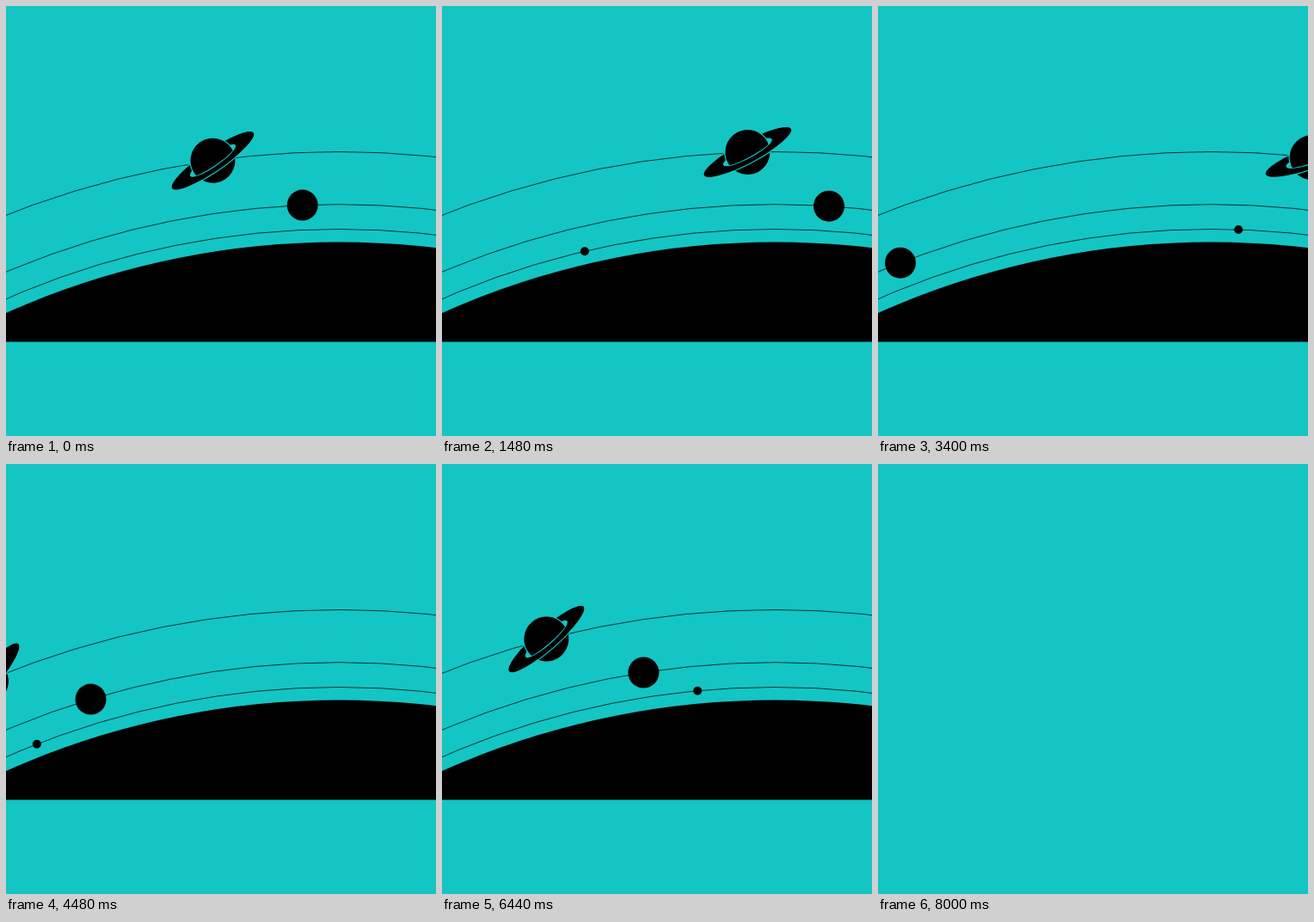
An HTML page with a canvas for the animation above (8040 ms loop, 500 by 500 pixels).

```html
<!DOCTYPE html>
<html>
<head>
<meta charset="utf-8">
<title>Orbits</title>
<style>
html, body { margin: 0; height: 100%; overflow: hidden; background: #13c5c3; }
canvas { display: block; }
</style>
</head>
<body>
<canvas id="stage" width="500" height="500"></canvas>
<script>
const ctx = document.getElementById('stage').getContext('2d');
const TEAL = '#13c5c3', INK = '#000';
const LOOP = 8040, STEP = 40, BLANK = 8000;
const CX = 387, CY = 1223.5, HORIZON = 949;
const DOT = 964, MOON = 992.8, RINGED = 1054;
const TAU = Math.PI * 2, RAD = Math.PI / 180;

function ellipse(x, y, a, b, fill) {
  ctx.beginPath();
  ctx.ellipse(x, y, a, b, 0, 0, TAU);
  if (fill) {
    ctx.fillStyle = fill;
    ctx.fill();
  }
}

const disc = (x, y, r, fill) => ellipse(x, y, r, r, fill);

// Angles are in degrees, clockwise from the top of the orbit.
function place(radius, angle) {
  return [CX + radius * Math.sin(angle * RAD), CY - radius * Math.cos(angle * RAD)];
}

function drawRinged(angle) {
  ctx.save();
  ctx.translate(...place(RINGED, angle));
  ctx.rotate((angle - 26.4) * RAD);
  disc(0, 0, 26, INK);
  ellipse(0, 0, 57.5, 12.4, INK);
  ctx.strokeStyle = TEAL;
  ctx.lineWidth = 1.2;
  ellipse(0, 0, 58.1, 13);
  ctx.stroke();
  ellipse(0, 0, 32, 7.2, TEAL);

  // The upper body passes in front of the far side of the ring.
  ctx.beginPath();
  ctx.moveTo(-32, -40);
  ctx.lineTo(32, -40);
  ctx.ellipse(0, 0, 32, 6, 0, 0, Math.PI);
  ctx.closePath();
  ctx.clip();
  disc(0, 0, 27.2, TEAL);
  disc(0, 0, 26, INK);
  ctx.restore();
}

function draw(ms) {
  ctx.fillStyle = TEAL;
  ctx.fillRect(0, 0, 500, 500);
  if (ms >= BLANK) return;

  const t = ms / 1000;
  ctx.save();
  ctx.beginPath();
  ctx.rect(0, 0, 500, 390.5);
  ctx.clip();

  ctx.strokeStyle = INK;
  ctx.lineWidth = 0.75;
  for (const r of [DOT, MOON, RINGED]) {
    disc(CX, CY, r);
    ctx.stroke();
  }
  disc(CX, CY, HORIZON, INK);

  const dotAngle = t < 4.08 ? -24.95 + 7.9 * t : -21.36 + 8.17 * (t - 4.48);
  disc(...place(DOT, dotAngle), 5, INK);
  disc(...place(MOON, -2.44 + 4.105 * t - (t > 2.65 ? 32.84 : 0)), 18, INK);
  drawRinged(-7.99 + 4.235 * t - (t > 4.06 ? 33.88 : 0));
  ctx.restore();
}

function frame() {
  draw(Math.floor(performance.now() % LOOP / STEP) * STEP);
  requestAnimationFrame(frame);
}
frame();
</script>
</body>
</html>
```
